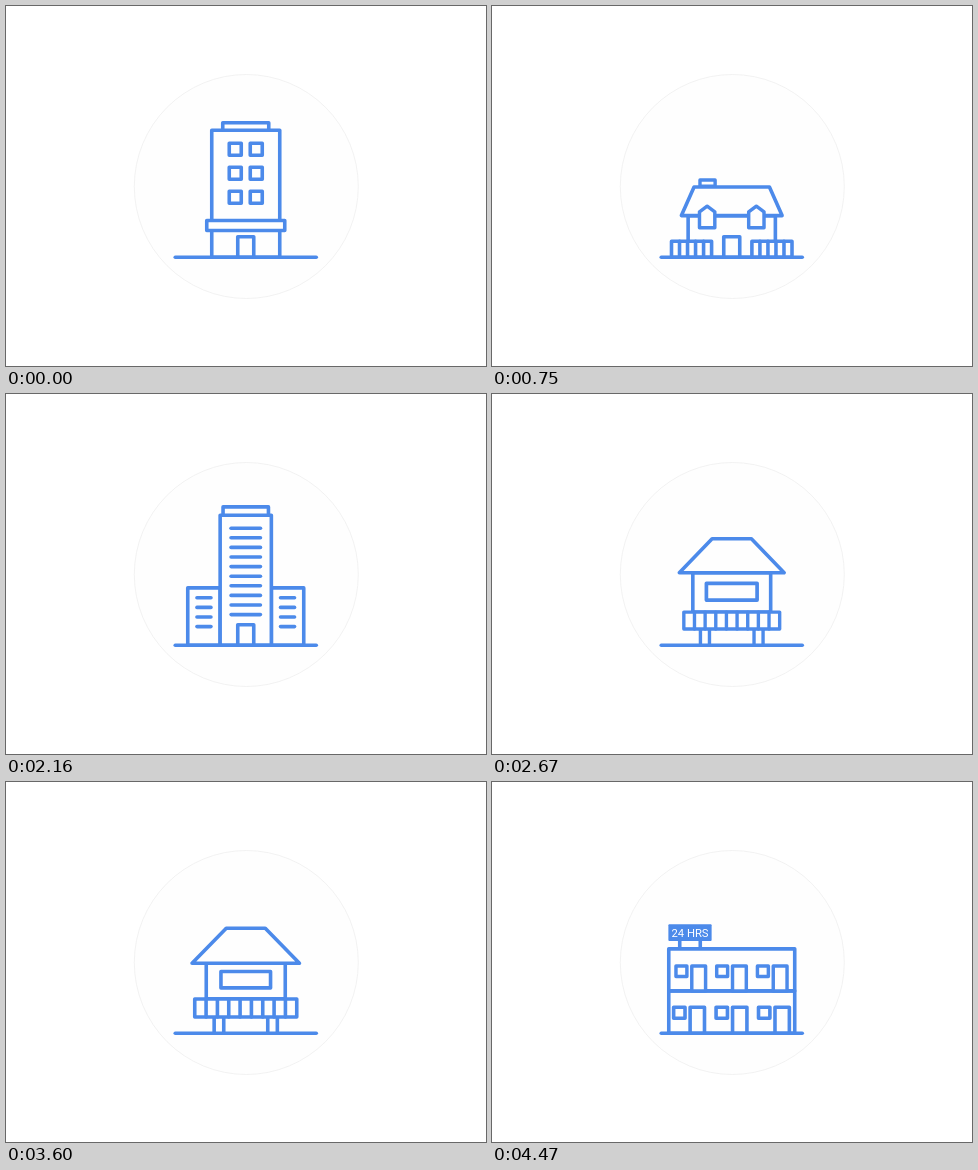
Write an HTML page with a canvas that moves like this. It is 480 px wide and 360 px high and loops after 4.5 s.

```html
<!DOCTYPE html>
<html lang="en">
<head>
<meta charset="utf-8">
<title>Buildings</title>
<style>
  html, body { margin: 0; height: 100%; overflow: hidden; background: #fff; }
  canvas { display: block; }
</style>
</head>
<body>
<canvas id="stage" width="480" height="360"></canvas>
<script>
const ctx = document.getElementById('stage').getContext('2d');
const LOOP = 4500, BLUE = '#4c8aea', PAPER = '#fefefe';
const CENTER = 239.75, GROUND = 251.2;
const SIDES = [-1, 1];

// Start of each change of building.
const TO_COTTAGE = 230, TO_OFFICE = 1130, TO_STILTS = 2300, TO_MOTEL = 3690;

// Every building is symmetric: half-widths and heights above the ground.
const building = (wall, top, eave, ridge, peak, door = 8, floor = 0) =>
  ({ wall, top, eave, ridge, peak, door, floor });

const hotel = building(34, 127, 23, 23, 134.5);
const cottage = building(43.5, 42.7, 50, 37.5, 71);
const office = building(25.6, 130, 22.7, 22.7, 138.3);
const stilts = building(39.5, 70, 53.7, 19.5, 105, 0, 34.5);
const motel = building(63, 42.3, 63, 63, 84.3, 0);

const scaled = (b, sx, sy, door) =>
  building(b.wall * sx, b.top * sy, b.eave * sx, b.ridge * sx, b.peak * sy, door);

const elastic = ms => 1 - Math.exp(-ms / 120) * Math.cos(ms * Math.PI / 174);
const easeOut = span => ms => 1 - (1 - Math.min(1, ms / span)) ** 3;

const moves = [
  [0, hotel, elastic],
  [TO_COTTAGE, cottage, elastic],
  [TO_OFFICE, scaled(office, 0.75, 1.05, 12.5), easeOut(130)],
  [TO_OFFICE + 130, office, elastic],
  [TO_STILTS, stilts, elastic],
  [TO_MOTEL, scaled(motel, 1.06, 0.945, 0), easeOut(210)],
  [TO_MOTEL + 210, motel, elastic]
];

let now = 0;

function currentPose() {
  const i = moves.findLastIndex(([start]) => now >= start);
  const [start, to, ease] = moves[i];
  const from = i ? moves[i - 1][1] : to;
  const k = ease(now - start);
  const pose = {};
  for (const key in to) pose[key] = from[key] + (to[key] - from[key]) * k;
  return pose;
}

// Points are [x, height].
function poly(points) {
  ctx.beginPath();
  points.forEach(([x, h]) => ctx.lineTo(x, -h));
  ctx.closePath();
  ctx.fill();
  ctx.stroke();
}

function line(x1, h1, x2, h2) {
  ctx.beginPath();
  ctx.moveTo(x1, -h1);
  ctx.lineTo(x2, -h2);
  ctx.stroke();
}

// Trapezoid centred on x, from half-width a at height low to b at height high.
const slab = (x, low, a, high, b = a) =>
  poly([[x - a, low], [x - b, high], [x + b, high], [x + a, low]]);

function railing(half, height, gaps) {
  slab(0, 0, half, height);
  for (let i = 1; i < gaps; i++) {
    const x = half * (2 * i / gaps - 1);
    line(x, 0, x, height);
  }
}

function slats(half, top, count) {
  for (let i = 0; i < count; i++) line(-half, top - i * 9.6, half, top - i * 9.6);
}

// Springs a detail in around (x, height) and shrinks it away again.
function pop(start, end, x, height, draw, shrink = 110) {
  if (now < start) return;
  let s = elastic(now - start);
  if (now > end) s *= Math.max(0, 1 - ((now - end) / shrink) ** 2);
  if (s < 0.02) return;
  ctx.save();
  ctx.translate(x, -height);
  ctx.scale(s, s);
  draw();
  ctx.restore();
}

function drawHotel() {
  for (let floor = 0; floor < 3; floor++)
    for (const side of SIDES)
      pop(-LOOP, TO_COTTAGE - 10 - floor * 20, side * 10.5, 60 + floor * 24, () => slab(0, -6, 6, 6));
  pop(-LOOP, TO_COTTAGE - 10, 0, 31.7, () => slab(0, -5, 39, 5));
}

function drawCottage() {
  pop(400, TO_OFFICE - 80, -24.2, 71, () => slab(0, 0, 8, 6.5));
  for (const side of SIDES) {
    pop(380, TO_OFFICE - 70, side * 24.6, 40, () =>
      poly([[-8, -11], [-8, 5.5], [0, 11.5], [8, 5.5], [8, -11]]));
    pop(330, TO_OFFICE, side * 40.2, 0, () => railing(20.2, 16, 5), 200);
  }
}

function drawWings() {
  for (const side of SIDES)
    pop(TO_OFFICE + 250, TO_STILTS - 40, side * 25.6, 0, () => {
      ctx.translate(side * 16.2, 0);
      slab(0, 0, 16.2, 57.3);
      slats(7, 47.4, 4);
    });
}

function drawOfficeFloors() {
  for (let i = 0; i < 10; i++)
    pop(TO_OFFICE + 200 + i * 15, TO_STILTS - 100 + i * 6, 0, 117 - i * 9.6, () => slats(14.7, 0, 1));
}

function drawStilts() {
  for (const side of SIDES)
    pop(TO_STILTS + 60, TO_MOTEL, side * 26.8, 0, () => {
      for (const edge of SIDES) line(edge * 4.8, 0, edge * 4.8, 16);
    });
  pop(TO_STILTS + 120, TO_MOTEL - 50, 0, 53.5, () => slab(0, -8.2, 24.8, 8.2));
  pop(TO_STILTS + 40, TO_MOTEL, 0, 16.2, () => railing(51, 18, 9));
}

function drawRooms(start, floor) {
  pop(start, LOOP, 0, floor, () => {
    for (const x of [-42.5, 0, 42.5]) {
      slab(x - 10, 15, 5.7, 26);
      slab(x + 8, 0, 7.2, 26);
    }
  });
}

function drawSign() {
  pop(3797, LOOP, -41.75, 92.5, () => {
    ctx.fillStyle = BLUE;
    ctx.beginPath();
    ctx.roundRect(-21.7, -16.5, 43.4, 16.7, 1);
    ctx.fill();
    for (const side of SIDES) line(side * 10.3, 0, side * 10.3, -7);
    ctx.fillStyle = '#fff';
    ctx.font = '11.3px Roboto, sans-serif';
    ctx.textAlign = 'center';
    ctx.fillText('24 HRS', 0, -4.1);
  });
}

function drawBackdrop() {
  ctx.fillStyle = '#fff';
  ctx.fillRect(0, 0, 480, 360);
  ctx.beginPath();
  ctx.arc(240.3, 180.5, 112, 0, Math.PI * 2);
  ctx.fillStyle = PAPER;
  ctx.fill();
  ctx.strokeStyle = '#ececec';
  ctx.lineWidth = 0.7;
  ctx.stroke();
}

function draw() {
  drawBackdrop();
  ctx.save();
  ctx.translate(CENTER, GROUND);
  ctx.strokeStyle = BLUE;
  ctx.lineWidth = 3.6;
  ctx.lineCap = ctx.lineJoin = 'round';

  const pose = currentPose();
  drawWings();
  slab(0, pose.floor, pose.wall, pose.top);
  slab(0, pose.top, pose.eave, pose.peak, pose.ridge);
  drawHotel();
  if (pose.door > 0.5) slab(0, 0, pose.door, 20.5);
  drawCottage();
  drawOfficeFloors();
  drawStilts();
  drawRooms(3846, 0);
  drawRooms(4100, 42.3);
  line(-70.5, 0, 70.5, 0);
  drawSign();
  ctx.restore();
}

const begin = performance.now();
function tick() {
  now = (performance.now() - begin) % LOOP;
  draw();
  requestAnimationFrame(tick);
}
tick();
</script>
</body>
</html>
```
